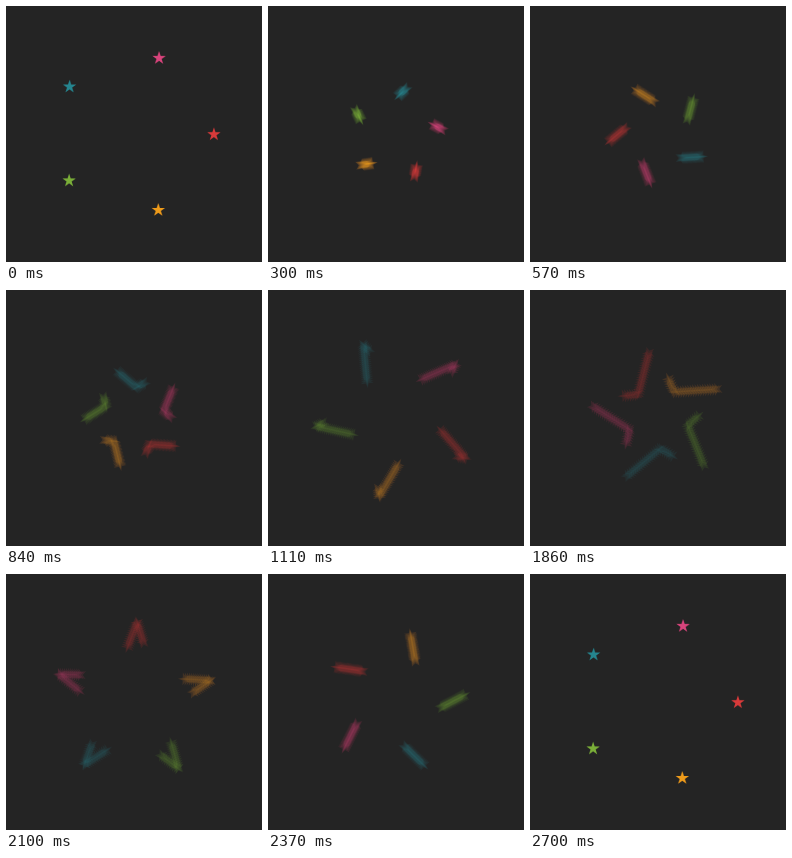
Write an HTML page with a canvas that moves like this. It is 256 px wide and 256 px high and loops after 2730 ms.

```html
<!DOCTYPE html>
<html lang="en">
<head>
<meta charset="utf-8">
<title>Star chase</title>
<style>
html, body { margin: 0; width: 100%; height: 100%; overflow: hidden; background: #242424; }
canvas { display: block; width: 256px; height: 256px; }
</style>
</head>
<body>
<canvas id="stage" width="256" height="256"></canvas>
<script>
const BACK = '#242424';
const COLORS = ['#d83a3a', '#ee9b1a', '#7aae38', '#25858f', '#d8447c'];
const STEP = 30, STEPS = 90;
const SAMPLES = 24, SHUTTER = 0.7, GAMMA = 2.2;
const OUTER = 80, RATIO = 0.382, SIZE = 7;
const BOX = 180, EDGE = (256 - BOX) / 2;

// step, corners passed, corners per step
const KEYS = [
  [0, 0, 0], [19, 4.58, 0.51], [28, 10.59, 0.83], [46, 30.72, 1.4],
  [62, 54.76, 1.46], [70, 65.55, 1.235], [90, 78, 0]
];

const stage = document.getElementById('stage').getContext('2d');
const scratch = document.createElement('canvas');
scratch.width = scratch.height = BOX;
const ctx = scratch.getContext('2d', { willReadFrequently: true });

const LINEAR = Float32Array.from({ length: 256 }, (_, v) => (v / 255) ** GAMMA);
const light = new Float32Array(BOX * BOX * 4);

function travel(s) {
  let k = 0;
  while (k < KEYS.length - 2 && s >= KEYS[k + 1][0]) k++;
  const [s0, y0, v0] = KEYS[k], [s1, y1, v1] = KEYS[k + 1];
  const h = s1 - s0, u = (s - s0) / h, w = 1 - u;
  return w * w * ((1 + 2 * u) * y0 + u * h * v0)
       + u * u * ((1 + 2 * w) * y1 - w * h * v1);
}

// corner n of a five-pointed star, even corners outside
function corner(n, radius, turn = 0) {
  const r = n % 2 ? radius * RATIO : radius, a = n * Math.PI / 5 + turn;
  return [r * Math.cos(a), r * Math.sin(a)];
}

function along(pos) {
  const n = Math.floor(pos), f = pos - n;
  const a = corner(n, OUTER), b = corner(n + 1, OUTER);
  return [a[0] + (b[0] - a[0]) * f, a[1] + (b[1] - a[1]) * f];
}

const star = new Path2D();
for (let n = 0; n < 10; n++) star.lineTo(...corner(n, SIZE, -Math.PI / 2));
star.closePath();

function drawSample(s) {
  const turn = s / STEPS * Math.PI * 2 / 5, pos = travel(s);
  ctx.setTransform(1, 0, 0, 1, 0, 0);
  ctx.fillStyle = BACK;
  ctx.fillRect(0, 0, BOX, BOX);
  COLORS.forEach((color, i) => {
    ctx.setTransform(1, 0, 0, 1, BOX / 2, BOX / 2);
    ctx.rotate(turn);
    ctx.translate(...along(pos + 2 * i));
    ctx.fillStyle = color;
    ctx.fill(star);
  });
}

// motion blur: average the samples as light, not as stored values
function draw(step) {
  light.fill(0);
  let image;
  for (let k = 0; k < SAMPLES; k++) {
    drawSample(step % STEPS + SHUTTER * k / SAMPLES);
    image = ctx.getImageData(0, 0, BOX, BOX);
    const data = image.data;
    for (let i = 0; i < data.length; i++) light[i] += LINEAR[data[i]];
  }
  for (let i = 0; i < light.length; i++) {
    image.data[i] = 255 * (light[i] / SAMPLES) ** (1 / GAMMA);
  }
  stage.putImageData(image, EDGE, EDGE);
}

stage.fillStyle = BACK;
stage.fillRect(0, 0, 256, 256);

let start = null, shown = 0;
function tick(now) {
  if (start === null) start = now;
  const step = Math.floor((now - start) / STEP) % (STEPS + 1);
  if (step !== shown) draw(shown = step);
  requestAnimationFrame(tick);
}
draw(0);
requestAnimationFrame(tick);
</script>
</body>
</html>
```
